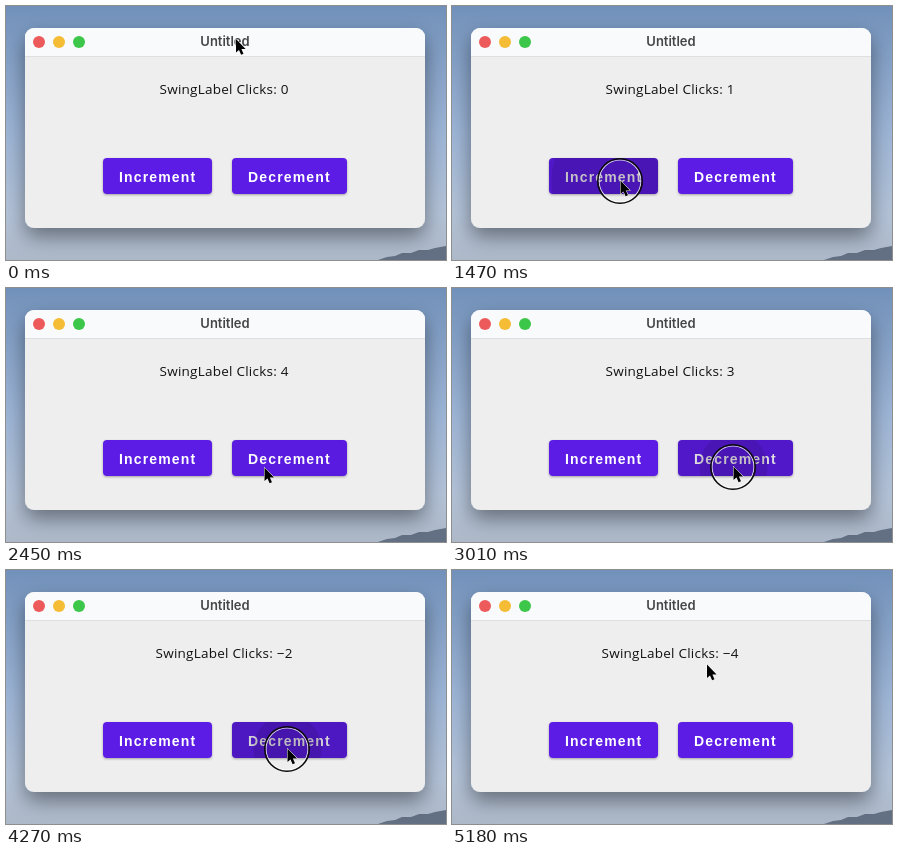
Write an HTML page that moves like this. It is 440x254 px and loops after 5460 ms.

```html
<!DOCTYPE html>
<html lang="en">
<head>
<meta charset="utf-8">
<title>Click counter</title>
<style>
  html, body { margin: 0; width: 100%; height: 100%; overflow: hidden; }
  svg { display: block; width: 100%; height: 100%; }
  .title { font: 600 13px Inter, sans-serif; fill: #454648; text-anchor: middle; }
  .label { font: 13.5px "Open Sans", sans-serif; letter-spacing: .24px; fill: #111; }
  .caption { font: bold 14px "Liberation Sans", sans-serif; letter-spacing: 1.15px; fill: #fff; }
  .face { fill: #5b1ee5; }
  .shade { fill: #10061f; }
</style>
</head>
<body>
<svg viewBox="0 0 440 254">
  <defs>
    <linearGradient id="sky" x2="0" y2="1">
      <stop offset="0" stop-color="#7291ba"/>
      <stop offset=".5" stop-color="#9db5d6"/>
      <stop offset=".82" stop-color="#b3c2d7"/>
      <stop offset="1" stop-color="#adb8c8"/>
    </linearGradient>
    <filter id="windowShadow" x="-20%" y="-20%" width="140%" height="150%">
      <feDropShadow dx="0" dy="9" stdDeviation="10" flood-opacity=".42"/>
    </filter>
    <filter id="buttonShadow" x="-10%" y="-20%" width="120%" height="150%">
      <feDropShadow dx="0" dy="1" stdDeviation="1" flood-opacity=".32"/>
    </filter>
    <clipPath id="windowClip"><rect x="19" y="22" width="400" height="200" rx="9"/></clipPath>
  </defs>

  <rect width="440" height="254" fill="url(#sky)"/>
  <path d="M372 254l9-3 8-1 7-3 9 0 8-3 9 0 7-2 11-2V254z" fill="#637084"/>

  <rect x="19" y="22" width="400" height="200" rx="9" fill="#eee" filter="url(#windowShadow)"/>
  <g clip-path="url(#windowClip)">
    <rect x="19" y="22" width="400" height="28" fill="#f8fafb"/>
    <rect x="19" y="50" width="400" height="1" fill="#dedfe0"/>
  </g>
  <circle cx="33" cy="36" r="6" fill="#ed5a5c"/>
  <circle cx="53" cy="36" r="6" fill="#f5bc35"/>
  <circle cx="73" cy="36" r="6" fill="#3cc64a"/>
  <text class="title" x="219" y="40">Untitled</text>
  <text class="label" id="label" y="88"></text>

  <g id="buttons"></g>

  <g id="ring" fill="none">
    <circle r="21" stroke="#fff" stroke-opacity=".8" stroke-width="1.2"/>
    <circle r="22.2" stroke="#0b0b0b" stroke-width="1.6"/>
  </g>
  <path id="cursor" d="M0 0V13.6L3 10.9 5.1 15.7 7.5 14.7 5.4 9.9H9.6Z"
        fill="#000" stroke="#fff" stroke-width="1" paint-order="stroke"/>
</svg>

<script>
const LOOP = 5460, STEP = 70, HOLD = 140, FADE = 280;

// time, x, y of the pointer tip
const PATH = [
  [70, 230, 33], [210, 225, 48], [350, 204, 96], [490, 181, 146], [630, 170, 168],
  [770, 168.5, 174.5], [2170, 168.5, 174.5], [2310, 202, 177], [2450, 258.5, 179.5],
  [2590, 281.5, 178.5], [4760, 281.5, 178.5], [4900, 273, 152], [5040, 257, 104],
  [5110, 255.5, 96.5], [5180, 255, 94.5]
];

const BUTTONS = [
  { text: 'Increment', x: 97, width: 109, delta: 1, hover: [630, 2310],
    presses: [1190, 1400, 1680, 1890] },
  { text: 'Decrement', x: 226, width: 115, delta: -1, hover: [2380, 4900],
    presses: [2730, 3010, 3290, 3570, 3780, 4060, 4270, 4550] }
];

const $ = id => document.getElementById(id);
const clamp = v => Math.max(0, Math.min(1, v));
const place = (el, x, y) => el.setAttribute('transform', `translate(${x} ${y})`);

$('buttons').innerHTML = BUTTONS.map(({ text, x, width }, i) => {
  const box = `x="${x}" y="152" width="${width}" height="36" rx="4"`;
  return `<clipPath id="clip${i}"><rect ${box}/></clipPath>
    <rect class="face" ${box} filter="url(#buttonShadow)"/>
    <text class="caption" x="${x + 16}" y="175.5">${text}</text>
    <g clip-path="url(#clip${i})">
      <rect class="shade" ${box} id="shade${i}"/>
      <circle class="shade" id="ripple${i}"/>
    </g>`;
}).join('');

function pointerAt(t) {
  const next = PATH.findIndex(key => key[0] > t);
  if (next === 0) return PATH[0].slice(1);
  if (next < 0) return PATH.at(-1).slice(1);
  const [t0, x0, y0] = PATH[next - 1], [t1, x1, y1] = PATH[next];
  const k = (t - t0) / (t1 - t0);
  return [x0 + (x1 - x0) * k, y0 + (y1 - y0) * k];
}

function draw(t) {
  const [x, y] = pointerAt(t);
  let count = 0, pressed = false;

  BUTTONS.forEach(({ delta, hover, presses }, i) => {
    const [enter, leave] = hover;
    const over = clamp((t - enter) / 210) * clamp(1 - (t - leave) / 140);
    let lingering = 0, rippleRadius = 0;
    for (const start of presses) {
      const age = t - start;
      if (age < 0) continue;
      if (age < HOLD) {
        pressed = true;
        rippleRadius = 34 + age * .5;
      } else {
        count += delta;
        lingering = Math.max(lingering, 1 - (age - HOLD) / FADE);
      }
    }
    $('shade' + i).setAttribute('opacity', .06 * over + .16 * lingering);
    const ripple = $('ripple' + i);
    ripple.setAttribute('cx', x);
    ripple.setAttribute('cy', y);
    ripple.setAttribute('r', rippleRadius);
    ripple.setAttribute('opacity', .12);
  });

  const label = $('label');
  label.textContent = 'SwingLabel Clicks: ' + String(count).replace('-', '\u2212');
  label.setAttribute('x', count < 0 ? 149.5 : 153.5);
  $('ring').style.display = pressed ? '' : 'none';
  place($('ring'), x - .5, y + .5);
  place($('cursor'), x, y);
}

const begin = performance.now();
function tick() {
  const t = (performance.now() - begin) % LOOP;
  draw(Math.floor(t / STEP) * STEP);
  requestAnimationFrame(tick);
}
tick();
</script>
</body>
</html>
```
